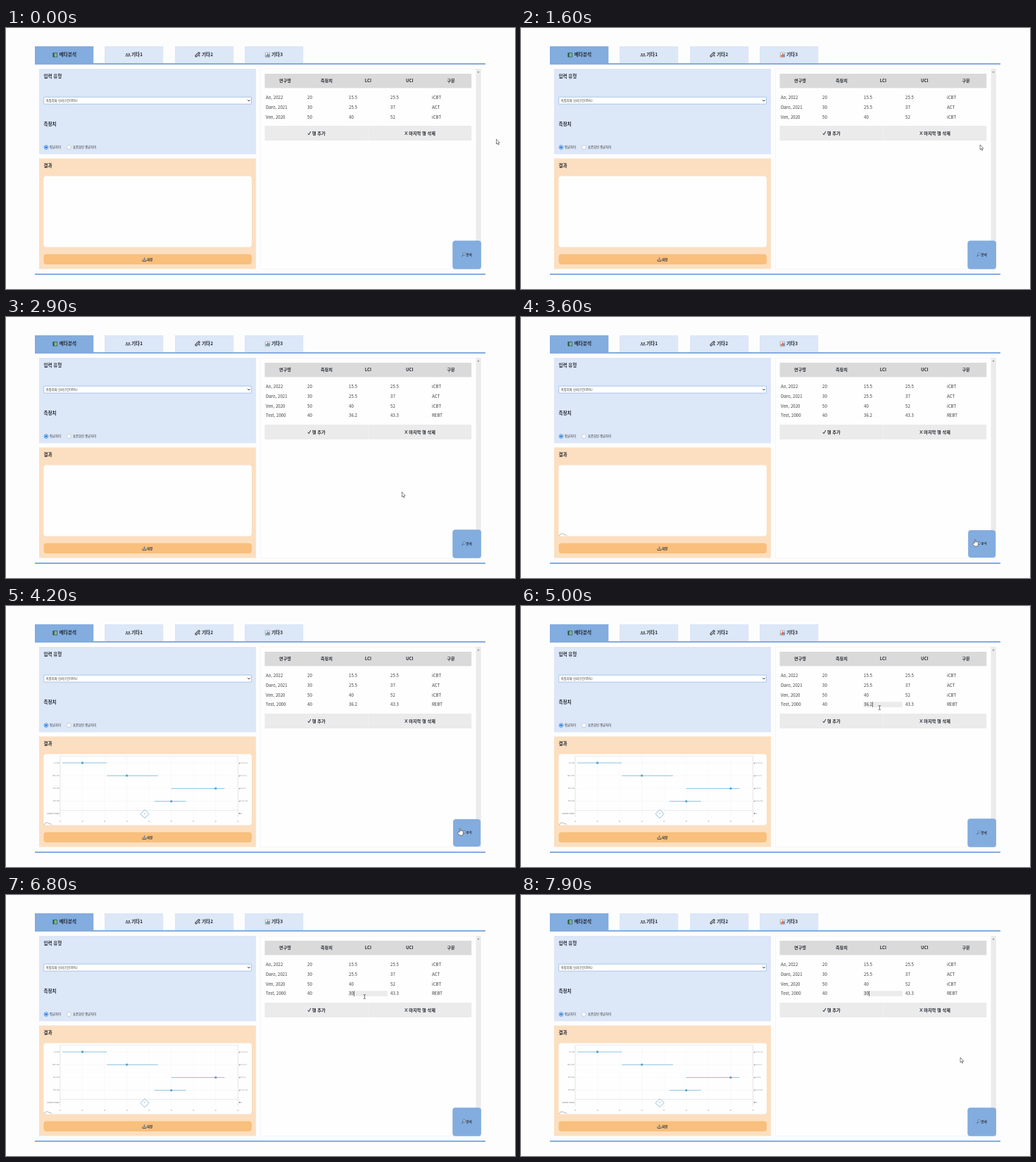
An HTML page for the animation above (8 s loop, 723x371 px).

```html
<!DOCTYPE html>
<html lang="ko">
<head>
<meta charset="utf-8">
<style>
html, body { margin: 0; width: 100%; height: 100%; overflow: hidden; background: #fefdfe; }
svg { display: block; width: 723px; height: 371px; }
text { font-family: "Noto Sans CJK KR", "Noto Sans CJK", "Noto Sans", sans-serif; font-size: 6.1px; fill: #383838; white-space: pre; }
.b { font-weight: 700; fill: #252a33; }
.s { font-size: 4.35px; }
.t { font-size: 2px; fill: #777; }
.m { text-anchor: middle; }
.e { text-anchor: end; }
</style>
</head>
<body>
<svg id="stage" viewBox="0 0 723 371"></svg>
<script>
const stage = document.getElementById('stage');
const LOOP = 8000;
const BLUE = '#83acdf', PALE = '#dce7f7', SAND = '#fcdfc0', DARK = '#252a33';

const rect = (x, y, w, h, fill, r = 0, extra = '') =>
  `<rect x="${x}" y="${y}" width="${w}" height="${h}" fill="${fill}" rx="${r}" ${extra}/>`;
const text = (x, y, s, cls = '', extra = '') => `<text x="${x}" y="${y}" class="${cls}" ${extra}>${s}</text>`;
const path = (d, stroke, w = 1, fill = 'none', extra = '') =>
  `<path d="${d}" stroke="${stroke}" stroke-width="${w}" fill="${fill}" ${extra}/>`;
const group = (id, body, extra = '') => `<g id="${id}" ${extra}>${body}</g>`;
const dot = (x, y, r, fill, extra = '') => `<circle cx="${x}" cy="${y}" r="${r}" fill="${fill}" ${extra}/>`;

function tabs() {
  const icons = [
    rect(66.5, 35, 6.5, 6.5, '#2c6650', .6) + rect(68.7, 36, 3.4, 4.5, '#b8d8b4') +
      path('M67.2 35.5v5.6M69.2 37.3h2.3M69.2 39h2.3', '#1c3d35', .6),
    dot(171.6, 37, 1.1, '#444') + dot(174.9, 37, 1.1, '#444') +
      path('M170.2 40.6v-1.6h2.7v1.6M173.6 40.6v-1.6h2.7v1.6', '#444', .9),
    path('M270 39.8l4-4', '#5d6068', 3.6, 'none', 'stroke-linecap="round"') +
      path('M270.2 39.6l3.4-3.4', '#d2d5da', 1.1) + dot(274.6, 39.6, 1, '#444'),
    rect(368.3, 35, 6.4, 6.6, '#f8f8f8', .3, 'stroke="#777" stroke-width=".5"') +
      rect(369.2, 38, 1.3, 3, '#3c9a5f') + rect(371, 36.2, 1.3, 4.8, '#d6453d') + rect(372.8, 37.2, 1.3, 3.8, '#3273bd')
  ];
  return ['메타분석', '기타1', '기타2', '기타3'].map((name, i) => {
    const x = [41, 140, 240, 339][i];
    return rect(x, 26, 83.3, 24.5, i ? PALE : BLUE) +
      text(x + (i ? 38 : 34.8), 40.4, name, 'b', 'style="font-size:6.6px"') + icons[i];
  }).join('') + rect(41, 50, 640, 2, BLUE) + rect(41, 349, 640, 2, BLUE);
}

function inputs() {
  return rect(47, 58, 308, 121.4, PALE) +
    text(53.6, 71, '입력 유형', 'b', 'style="font-size:6.5px"') +
    rect(53.7, 98.2, 294.8, 9.9, '#fff', .5, 'stroke="#8fb4e2" stroke-width=".7"') +
    text(56.8, 104.7, '측정치와 신뢰구간(95%)', 's') +
    path('M343.3 102.2l1.7 1.8 1.7-1.8', '#222', .9) +
    text(53.6, 139.4, '측정치', 'b', 'style="font-size:6.5px"') +
    dot(57, 169.6, 2.8, '#fff', 'stroke="#1976e0" stroke-width=".8"') + dot(57, 169.6, 1.7, '#1976e0') +
    text(62, 171.1, '평균차이', 's') +
    dot(89.3, 169.6, 3, '#fff', 'stroke="#a4a8b0" stroke-width=".5"') +
    text(95, 171.1, '표준화된 평균차이', 's');
}

function chart() {
  const px = v => 77 + (v - 15) * 6.31;
  const rows = [['Ao, 2022', 20, 15.5, 25.5], ['Daro, 2021', 30, 25.5, 37], ['Ven, 2020', 50, 40, 52], ['Test, 2000', 40, 36.2, 43.3]];
  let out = '';
  for (let v = 15; v <= 55; v += 5)
    out += path(`M${px(v)} 213.5V300`, '#f3f4f6', .5) + text(px(v), 307.2, v, 't m');
  out += path('M77 213.5H329.5M77 290.5H329.5', '#dfe1e5', .6) + path('M77 213.5V300M329.5 213.5V300', '#d5d8de', .6);
  rows.forEach(([name, mid, lo, hi], i) => {
    const y = 223 + i * 18.2;
    out += path(`M77 ${y}H329.5`, '#f1f2f4', .5) +
      path(`M${px(lo)} ${y}H${px(hi)}`, '#7fbfdd', .9) + rect(px(mid) - 1.4, y - 1.4, 2.8, 2.8, '#4ba3cb', .5) +
      text(76, y + .7, name, 't e') + text(330.8, y + .7, `■ ${mid} [${lo}, ${hi}]`, 't', 'style="font-size:1.7px"');
  });
  return out + path('M197 289.6l6 6-6 6-6-6z', '#7fb4dc', .9, '#fff') + text(197, 296.2, '34', 't m') +
    text(76, 296.3, 'Combined estimate', 't e') + text(330.8, 296.3, '■ 34', 't');
}

function results() {
  return rect(47, 185.5, 308, 157, SAND) +
    text(53.6, 198.4, '결과', 'b', 'style="font-size:6.5px"') +
    rect(53.5, 210.5, 295.5, 101, '#fefefe', 4) +
    group('chart', chart()) +
    group('mark', path('M54.5 311l1.4-2.5 3-.7 2.2 1.5 2.3.2 1.5 1.7', '#888', .6)) +
    rect(53.5, 321.6, 295.5, 14.4, '#f9bf7c', 4) +
    path('M194 329.3v2.2h5v-2.2', '#3d4c5e', .9) + path('M196.5 326v3.6M195.1 328.3l1.4 1.5 1.4-1.5', '#356eb0', .8) +
    text(200.2, 330.6, '저장', 'b s');
}

function row(y, cells, id = '') {
  return cells.map((c, i) => text(369 + i * 59, y, c, '', id && i === 2 ? `id="${id}"` : '')).join('');
}

function table() {
  const check = path('M428.8 149.8l1.4 2 2.6-4.8', 'currentColor', 1);
  const cross = path('M566.8 147.2l3.2 4.6M570.2 147.2l-3.6 4.6', 'currentColor', 1);
  return rect(361.3, 58.3, 313.4, 284.4, '#fefefe', 0, 'stroke="#f0f0f2" stroke-width=".6"') +
    rect(667.5, 58, 7.2, 285, '#ebebec') + path('M669.5 63.2l1.5-1.8 1.5 1.8z', 'none', 0, '#777') +
    rect(367.5, 65, 293.7, 20.4, '#dadada') +
    ['연구명', '측정치', 'LCI', 'UCI', '구분'].map((h, i) => text(396.5 + i * 58.9, 77.4, h, 'b m')).join('') +
    row(101.2, ['Ao, 2022', '20', '15.5', '25.5', 'iCBT']) +
    row(114.9, ['Daro, 2021', '30', '25.5', '37', 'ACT']) +
    row(128.6, ['Ven, 2020', '50', '40', '52', 'iCBT']) +
    group('extra', rect(486.5, 136.2, 55.3, 7.8, '#ececec', 0, 'id="field"') +
      row(142.3, ['Test, 2000', '40', '36.2', '43.3', 'REBT'], 'cell') +
      rect(0, 136.3, .6, 7.6, '#222', 0, 'id="caret"')) +
    group('bar',
      rect(367.5, 139, 147, 21, '#ebebeb', 0, 'id="add"') + rect(514.5, 139, 146.7, 21, '#ebebeb', 0, 'id="del"') +
      group('addText', check + text(434.8, 151.8, '행 추가', 'b', 'style="fill:currentColor;font-size:6.2px"')) +
      group('delText', cross + text(572.3, 151.8, '마지막 행 삭제', 'b', 'style="fill:currentColor;font-size:6.2px"')));
}

function fab() {
  return group('fab', rect(634.3, 302.3, 40.6, 40.4, BLUE, 4) +
    dot(650.7, 321.2, 1.6, '#cfe2f5', 'stroke="#30496a" stroke-width=".7"') + path('M649.5 322.5l-2 2.1', '#30496a', 1) +
    text(653.8, 324, '분석', 'b s'));
}

function pointers() {
  return group('arrow', path('M0 0v7l1.6-1.4 1.1 2.5 1.1-.5-1.1-2.4h2.1z', '#333', .6, '#fff')) +
    group('hand', path('M-.7 5.2V.7q.7-1 1.4 0v3q.8-.7 1.4 0 .8-.5 1.3.2.8-.3 1.1.6v2.6L3.6 10H-.6L-3.6 6.4q0-1.2 1.3-.7z', '#333', .6, '#fff')) +
    group('beam', path('M-1.7-3q1.2 0 1.7.6q.5-.6 1.7-.6M0-2.4v4.8M-1.7 3q1.2 0 1.7-.6q.5.6 1.7.6', '#333', .7));
}

stage.innerHTML = rect(0, 0, 723, 371, '#fefdfe') + tabs() + inputs() + results() + table() + fab() + pointers();
const el = {};
stage.querySelectorAll('[id]').forEach(n => el[n.id] = n);
const show = (n, on) => n.setAttribute('visibility', on ? 'visible' : 'hidden');

// time, x, y of the pointer tip
const TRACK = [
  [0, 696.5, 158], [500, 700, 163], [700, 702, 166], [1050, 717, 176], [1450, 682, 171], [1600, 652, 166],
  [2050, 441, 150], [2450, 441, 150], [3250, 645, 316], [4250, 645, 316], [4850, 509.3, 144.5],
  [7000, 509.3, 144.5], [7700, 630, 230], [7900, 624, 231], [8000, 624, 231]
];
const KEYS = [[0, '36.2'], [5500, '36.'], [5700, '36'], [5900, '3'], [6600, '30']];
const ADD = 2200, RUN = 3500, DRAWN = 3900, FOCUS = 4900;

function pointer(t) {
  const i = Math.max(1, TRACK.findIndex(k => k[0] >= t));
  const [t0, x0, y0] = TRACK[i - 1], [t1, x1, y1] = TRACK[i];
  const p = (t - t0) / (t1 - t0), q = p * p * (3 - 2 * p);
  return [x0 + (x1 - x0) * q, y0 + (y1 - y0) * q];
}

function hovered(t) {
  const [x, y] = pointer(t), top = t >= ADD ? 153 : 139;
  if (y < top || y > top + 21 || x < 367.5 || x > 661) return '';
  return x < 514.5 ? 'add' : 'del';
}

function update(t) {
  const [x, y] = pointer(t);
  const added = t >= ADD, focus = t >= FOCUS;
  show(el.extra, added);
  el.bar.setAttribute('transform', `translate(0 ${added ? 14 : 0})`);

  const hot = hovered(Math.max(0, t - 150));
  for (const k of ['add', 'del']) {
    el[k].setAttribute('fill', hot === k ? '#d6d6d6' : '#ebebeb');
    el[k + 'Text'].style.color = hot === k ? '#fff' : DARK;
  }

  show(el.mark, t >= RUN);
  show(el.chart, t >= DRAWN);

  const [keyAt, value] = KEYS.filter(k => k[0] <= t).pop();
  if (el.cell.textContent !== value) el.cell.textContent = value;
  const since = t - Math.max(FOCUS, keyAt);
  show(el.field, focus);
  show(el.caret, focus && since % 1000 < 500);
  el.caret.setAttribute('x', 487.3 + el.cell.getComputedTextLength());

  const onFab = x > 634 && x < 675 && y > 302 && y < 343;
  el.fab.setAttribute('transform', onFab ? 'translate(654.6 322.5) scale(.96) translate(-654.6 -322.5)' : '');

  const onCell = added && x > 486 && x < 542 && y > 136 && y < 147;
  const kind = onFab || (hovered(t) !== '') ? 'hand' : onCell ? 'beam' : 'arrow';
  for (const k of ['arrow', 'hand', 'beam']) {
    show(el[k], k === kind);
    el[k].setAttribute('transform', `translate(${x} ${y})`);
  }
}

const start = performance.now();
function frame(now) {
  update(Math.max(0, now - start) % LOOP);
  requestAnimationFrame(frame);
}
update(0);
requestAnimationFrame(frame);
</script>
</body>
</html>
```
